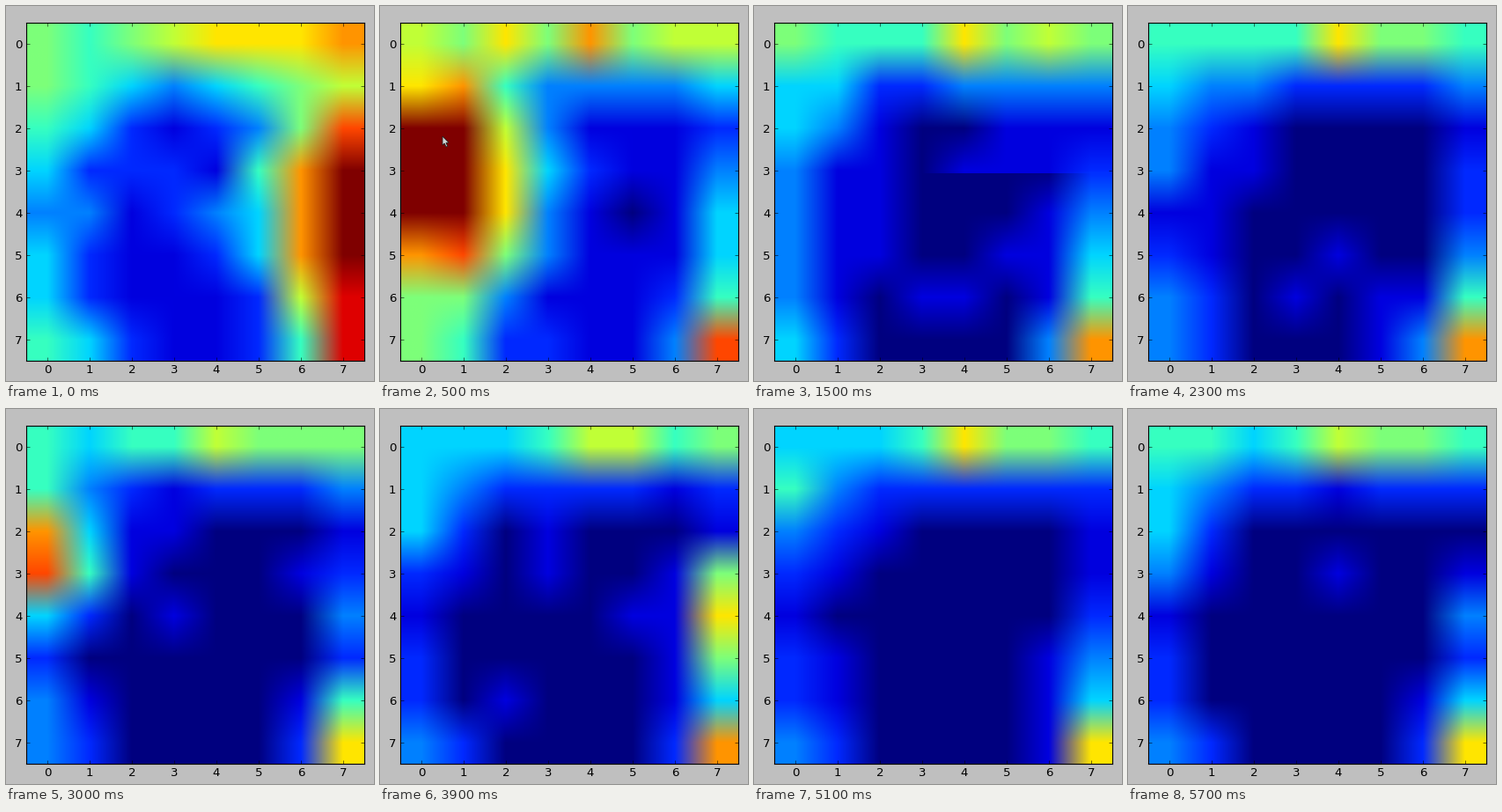
A matplotlib script that plays this animation: 418x426 px, repeating every 5.8 s.

```python
import numpy as np
import matplotlib.pyplot as plt
from matplotlib.animation import FuncAnimation
from matplotlib.patches import Polygon, Rectangle

W, H, DPI = 418, 426, 80
FRAMES, STEP = 58, 100
CELLS, TOP_LEVEL = 8, 12
LEFT, BOTTOM, SIDE = 23, 23, 384
TEAR_AT, TEAR_Y = 15, 190
ROW, COL = np.mgrid[:CELLS, :CELLS]

plt.rcParams.update({
    "font.family": "DejaVu Sans", "font.size": 12,
    "axes.linewidth": 1.0,
    "xtick.direction": "in", "ytick.direction": "in",
    "xtick.top": True, "ytick.right": True,
    "xtick.major.size": 4, "ytick.major.size": 4,
    "xtick.major.width": 0.5, "ytick.major.width": 0.5,
    "xtick.major.pad": 4, "ytick.major.pad": 4,
})


def blob(y, x, ry, rx, gain):
    """Soft warm spot on the sensor grid."""
    return gain * np.exp(-((ROW - y) / ry) ** 2 - ((COL - x) / rx) ** 2)


def room():
    """Resting view: warm edges around a cold middle."""
    top = blob(0, 5.5, 1, 7, 6) + blob(0, 4, 0.6, 0.7, 2)
    left = blob(4, 0, 6, 0.85, 2) + blob(1.7, 0.3, 1.3, 1.5, 2.2)
    right = blob(5, 7, 2.8, 0.7, 3)
    corners = blob(7, 0.3, 1, 1.2, 2.2) + blob(7, 7, 0.9, 0.9, 6.5)
    return top + left + right + corners


def sweep(t):
    """Hand crossing from right to left, then leaving."""
    fade = np.clip((1 - t) / 0.5, 0, 1)
    return blob(3.7 - 0.4 * t, 7 - 12.4 * t, 2.35, 1.7, 12.5 * fade)


def touch(t, peak, y, x, out, ry, rx, gain):
    """Hand dipping in over an edge and back out."""
    near = np.exp(-((t - peak) / 0.25) ** 2)
    return blob(y, x + out * (1 - near), ry, rx, gain * near)


REST = room()
FLICKER = np.random.default_rng(8).normal(0, 0.4, (FRAMES, CELLS, CELLS))


def reading(i):
    t = i * STEP / 1000
    ambient = 1.4 * np.exp(-t / 1.2) - 0.07 * t
    hands = (sweep(t)
             + touch(t, 3.0, 2.7, -0.3, -1.2, 1.2, 1.4, 8.5)
             + touch(t, 3.9, 3.8, 7.3, 1.2, 1.1, 1.0, 7))
    return REST + ambient + hands + FLICKER[i]


def colours(level):
    # Colours, not levels, are blended between the cells
    return plt.cm.jet(np.clip(np.round(level), 0, TOP_LEVEL) / TOP_LEVEL)


fig = plt.figure(figsize=(W / DPI, H / DPI), dpi=DPI, facecolor="0.75")
ax = fig.add_axes([LEFT / W, BOTTOM / H, SIDE / W, SIDE / H])
ax.set_xticks(range(CELLS))
ax.set_yticks(range(CELLS))

heat, upper = (ax.imshow(colours(REST), interpolation="bilinear",
                         aspect="auto") for _ in range(2))
upper.set_clip_path(Rectangle((0, 1 - TEAR_Y / H), 1, TEAR_Y / H,
                              transform=fig.transFigure))

arrow = np.array([(71, 148), (71, 158), (73.3, 156), (75, 160),
                  (76.6, 159.2), (75, 155.4), (78, 155.2)])
cursor = Polygon(np.c_[arrow[:, 0] / W, 1 - arrow[:, 1] / H],
                 facecolor="#d0d8d8", edgecolor="#202020", linewidth=0.7,
                 transform=fig.transFigure, zorder=10)
fig.add_artist(cursor)


def draw(i):
    heat.set_data(colours(reading(i)))
    # A torn refresh leaves the previous picture above the line
    upper.set_data(colours(reading(i - 1)))
    upper.set_visible(i == TEAR_AT)
    cursor.set_visible(4 <= i <= 6)
    return heat, upper, cursor


anim = FuncAnimation(fig, draw, frames=FRAMES, interval=STEP,
                     init_func=lambda: draw(0), repeat=True, repeat_delay=0)
plt.show()
```
